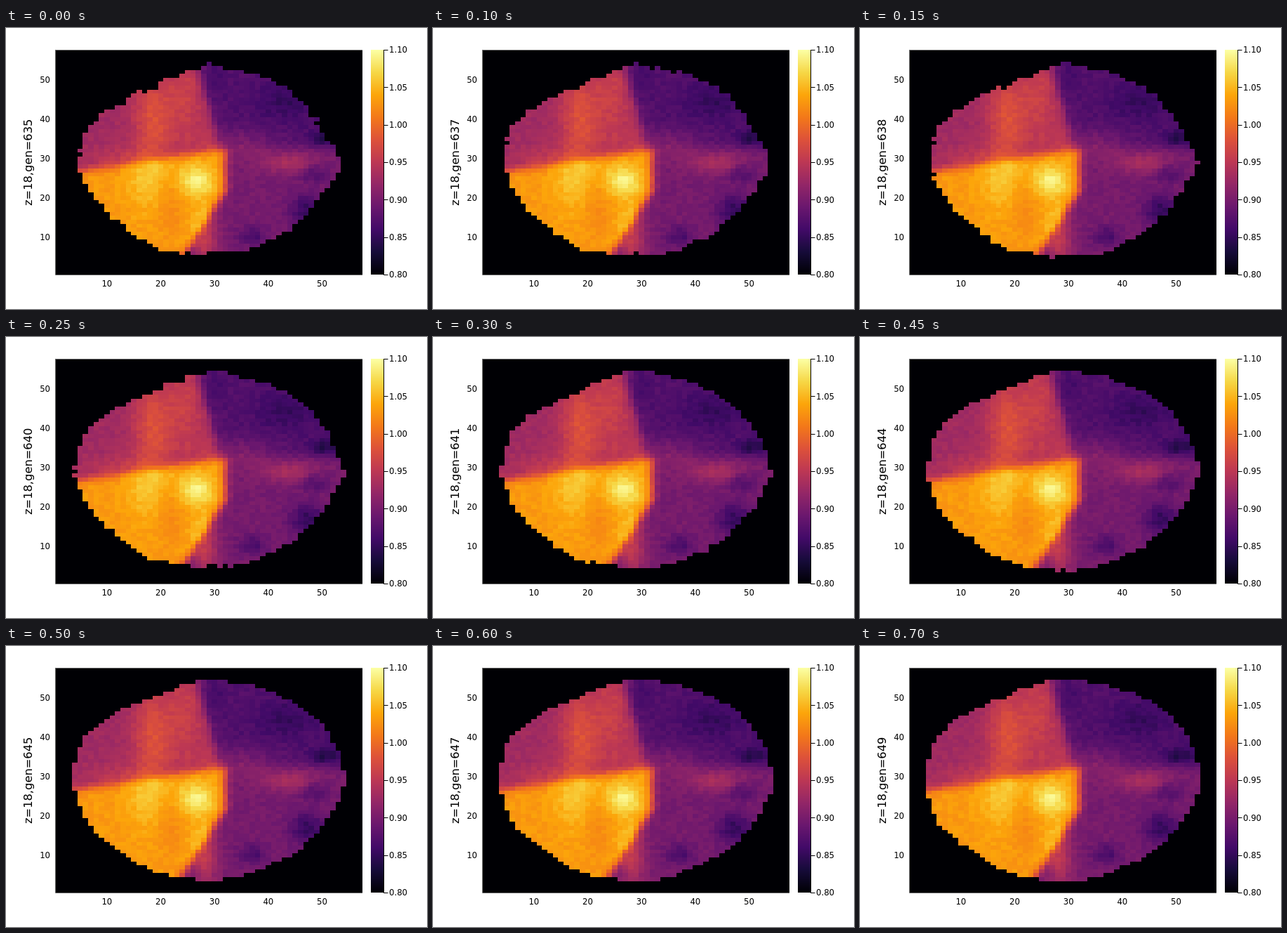
These frames come from a looping animation (600x400 px, 750 ms). An HTML page with a canvas:

```html
<!DOCTYPE html>
<html lang="en">
<head>
<meta charset="utf-8">
<title>Heatmap slice</title>
<style>
html, body { margin: 0; width: 100%; height: 100%; overflow: hidden; background: #fff; }
canvas, svg { position: absolute; left: 0; top: 0; width: 600px; height: 400px; }
text { font: 11.7px "DejaVu Sans", sans-serif; fill: #000; }
#gen { font-size: 16.3px; text-anchor: middle; }
</style>
</head>
<body>
<canvas id="map" width="600" height="400"></canvas>
<svg id="axes" viewBox="0 0 600 400">
  <path d="M71 31.5H508M70.5 31V351.5H508" fill="none" stroke="#666"/>
  <path d="M538.5 31V351" stroke="#000"/>
  <text id="gen" transform="translate(36.5 191.3) rotate(-90)"></text>
</svg>
<script>
const STEP = 50, STEPS = 15, N = 57;
const X0 = 71, Y0 = 31.5, CW = 437 / N, CH = 320 / N;
const ctx = document.getElementById('map').getContext('2d');
const axes = document.getElementById('axes');
const gen = document.getElementById('gen');

// Radius of the cell mass every 18 degrees, clockwise from the right
const MID = { x: 290, y: 194 };
const young = [188, 162, 148, 137, 130, 124, 131, 141, 150, 168,
  188, 182, 151, 135, 133, 141, 138, 149, 158, 166];
const grown = [196, 178, 162, 146, 143, 141, 142, 154, 163, 187,
  197, 193, 168, 147, 144, 146, 148, 158, 175, 190];

// Soft spots on the quarters: x, y, half width, half height, change of level
const spots = [
  [210, 130, 20, 45, .16], [258, 95, 22, 50, .1], [165, 182, 35, 10, .06],
  [400, 105, 30, 18, -.07], [290, 75, 12, 18, -.07], [455, 158, 15, 9, -.11],
  [325, 162, 40, 14, .09], [200, 218, 20, 32, .07], [272, 218, 18, 15, .19],
  [232, 250, 14, 28, -.04], [405, 193, 28, 10, .12], [440, 207, 14, 9, -.1],
  [352, 296, 14, 10, -.11], [430, 260, 18, 16, -.16], [284, 300, 13, 28, .18]];

const inferno = ['000004', '160b39', '420a68', '6a176e', '932667', 'bc3754',
  'dd513a', 'f37819', 'fca50a', 'f6d746', 'fcffa4']
  .map(h => [0, 2, 4].map(i => parseInt(h.slice(i, i + 2), 16)));

const clamp = v => Math.max(0, Math.min(1, v));
const mix = (a, b, k) => a + (b - a) * k;
const soft = d => 1 / (1 + Math.exp(-d / 3.5));

function color(v) {
  const p = clamp(v) * 10, i = Math.min(9, Math.floor(p));
  return `rgb(${inferno[i].map((c, n) => Math.round(mix(c, inferno[i + 1][n], p - i)))})`;
}

function hash(a, b, c) {
  const s = Math.sin(a * 127.1 + b * 311.7 + c * 74.7) * 43758.5453;
  return s - Math.floor(s) - .5;
}

// Four flat quarters with soft borders, then the spots
function level(x, y) {
  const top = soft(x - 274 - (y - 50) * .25);
  const low = soft(x - 313 + .65 * Math.max(0, y - 232));
  const side = soft(y - Math.max(168, 205 - .15 * (x - 95)));
  const base = mix(mix(.43, .24, top), mix(.775, .33, low), side);
  return spots.reduce((v, [sx, sy, w, h, a]) =>
    v + a * Math.exp(-(((x - sx) / w) ** 2 + ((y - sy) / h) ** 2) / 2), base);
}

const cells = Array.from({ length: N * N }, (_, i) => {
  const c = i % N, r = Math.floor(i / N);
  const x = X0 + (c + .5) * CW, y = Y0 + (r + .5) * CH;
  const turn = (Math.atan2(y - MID.y, x - MID.x) / (2 * Math.PI) + 1) % 1 * young.length;
  const k = Math.floor(turn), next = (k + 1) % young.length;
  return {
    c, r,
    value: level(x, y) + hash(c, r, 1) * .045,
    dist: Math.hypot(x - MID.x, y - MID.y),
    rough: hash(c, r, 7),
    from: mix(young[k], young[next], turn - k),
    to: mix(grown[k], grown[next], turn - k)
  };
});

function draw(s) {
  const age = s / (STEPS - 1), growth = 1 - (1 - age) ** 1.5;
  ctx.fillStyle = color(0);
  ctx.fillRect(71, 31, 437, 320);
  for (const { c, r, value, dist, rough, from, to } of cells) {
    if (dist > mix(from, to, growth) + rough * mix(6, 1, age)) continue;
    const x = Math.round(X0 + c * CW), y = Math.round(Y0 + r * CH);
    ctx.fillStyle = color(value + hash(c, r, s + 2) * .008);
    ctx.fillRect(x, y, Math.round(X0 + (c + 1) * CW) - x, Math.round(Y0 + (r + 1) * CH) - y);
  }
  gen.textContent = `z=18,gen=${635 + s}`;
}

function add(tag, attrs, text = '') {
  const el = document.createElementNS('http://www.w3.org/2000/svg', tag);
  for (const k in attrs) el.setAttribute(k, attrs[k]);
  el.textContent = text;
  axes.append(el);
}

for (let v = 10; v <= 50; v += 10) {
  add('text', { x: X0 + (v - .5) * CW, y: 367.5, 'text-anchor': 'middle' }, v);
  add('text', { x: 63, y: Y0 + (N - v + .5) * CH + 4.3, 'text-anchor': 'end' }, v);
}
for (let i = 0; i < 7; i++) {
  const y = 351 - i * 320 / 6;
  add('path', { d: `M538 ${Math.round(y) + .5}h6.5`, stroke: '#000' });
  add('text', { x: 546, y: y + 4.3 }, (.8 + i * .05).toFixed(2));
}
for (let y = 0; y < 320; y++) {
  ctx.fillStyle = color(1 - y / 319);
  ctx.fillRect(520, 31 + y, 18, 1);
}

const start = performance.now();
let shown = -1;
function tick() {
  const s = Math.floor(Math.max(0, performance.now() - start) / STEP) % STEPS;
  if (s !== shown) draw(shown = s);
  requestAnimationFrame(tick);
}
tick();
</script>
</body>
</html>
```
